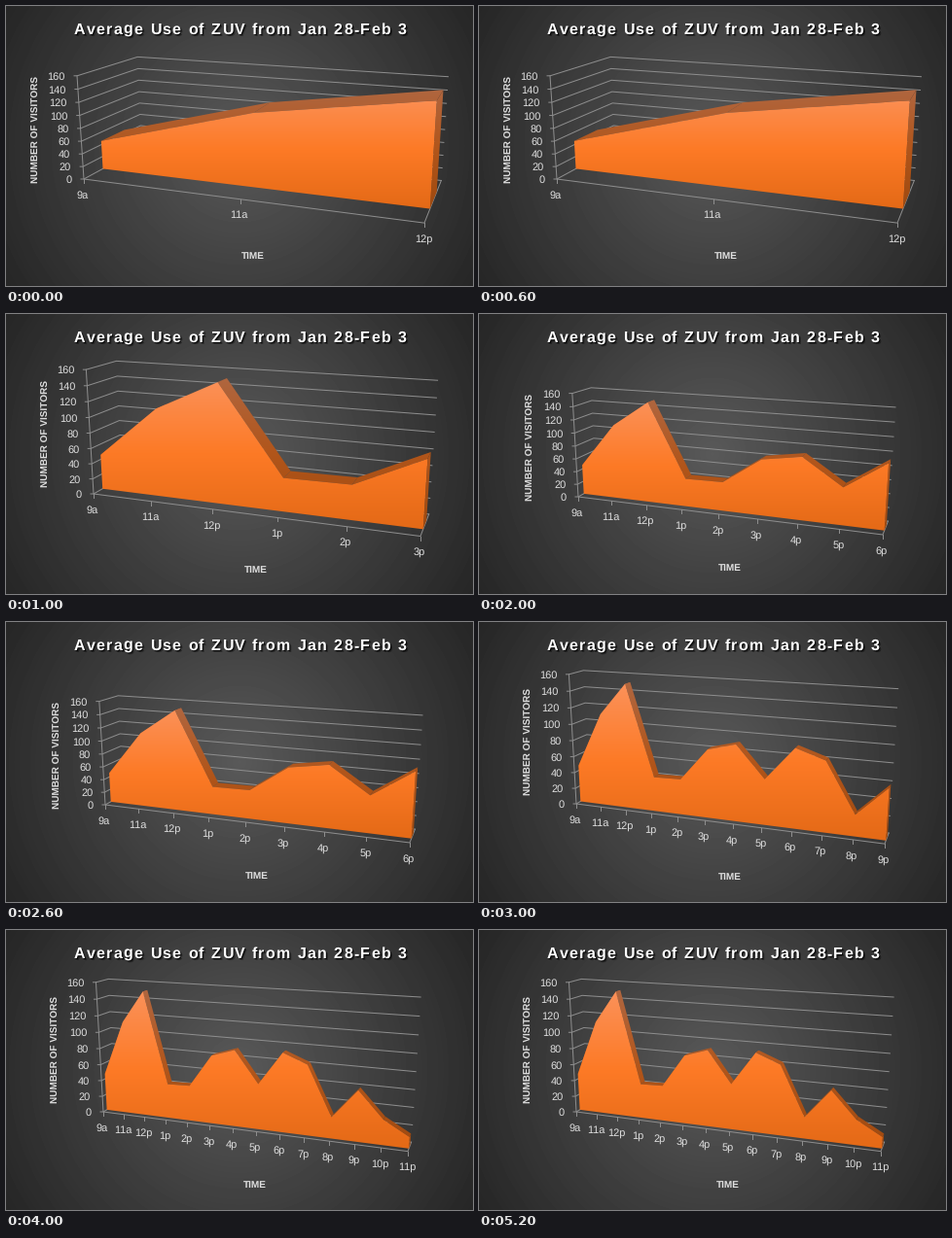
Recreate the animation shown at these times as a matplotlib script. Size 480 by 288 pixels, loop 6000 ms.

```python
import numpy as np
import matplotlib.pyplot as plt
from matplotlib.animation import FuncAnimation
from matplotlib.patches import Polygon
from matplotlib.textpath import TextPath

W, H, DPI = 480, 288, 96
PX = 72 / DPI
FONT = "Liberation Sans"
LINE = "#8e8e8e"
TEXT = "#dedede"
YAW, PITCH, DISTANCE = np.radians(20), np.radians(15), 2.15

HOURS = ["9a", "11a", "12p"] + [f"{h}p" for h in range(1, 12)]
VISITORS = [46, 113, 151, 42, 43, 82, 91, 54, 93, 82, 25, 59, 29, 13]
TOP = 160

plt.rcParams["text.hinting"] = "none"
plt.rcParams["text.hinting_factor"] = 1
fig = plt.figure(figsize=(W / DPI, H / DPI), dpi=DPI)
ax = fig.add_axes([0, 0, 1, 1])
ax.axis("off")


def camera(base, width, height, depth):
    """Map (across, up, back), each 0..1 in the chart box, to pixels."""
    tall = 1.03 * height / width

    def view(u, v, d):
        x, y, z = u - 0.5, (v - 0.5) * tall, (d - 0.5) * depth
        x, z = (x * np.cos(YAW) + z * np.sin(YAW),
                z * np.cos(YAW) - x * np.sin(YAW))
        y, z = (y * np.cos(PITCH) + z * np.sin(PITCH),
                z * np.cos(PITCH) - y * np.sin(PITCH))
        return np.array([x, -y]) / (DISTANCE + z)

    corner = view(0, 0, 0)
    scale = width / (view(1, 0, 0) - corner)[0]
    return lambda u, v, d: base + scale * (view(u, v, d) - corner)


def line(*pts):
    xs, ys = zip(*pts)
    return ax.plot(xs, ys, color=LINE, lw=PX, zorder=2)[0]


def label(x, y, s, size=11, **kw):
    kw = {"ha": "center", "va": "baseline", "color": TEXT, "zorder": 8, **kw}
    return ax.text(x, y, s, family=FONT, size=size * PX, **kw)


def orange(shade):
    stops = np.array([(251, 146, 91), (253, 122, 38), (227, 105, 22)]) / 255
    t = np.linspace(0, 1, 200)
    cols = [np.interp(t, [0, 0.5, 1], stops[:, k]) for k in range(3)]
    return np.stack(cols, axis=1)[:, None, :] * shade


def paint(pts, span, shade, z):
    """Fill a polygon with the vertical orange gradient."""
    pts = np.array(pts)
    x0, x1 = pts[:, 0].min() - 1, pts[:, 0].max() + 1
    img = ax.imshow(orange(shade), extent=(x0, x1, span[1], span[0]),
                    aspect="auto", interpolation="bilinear", zorder=z)
    img.set_clip_path(Polygon(pts, transform=ax.transData))
    return img


def chart(count, x, y, width, height):
    at = camera(np.array([x, y]), width, height, depth=1.05 / count)
    us = np.linspace(0, 1, count)
    vs = np.array(VISITORS[:count]) / TOP
    end = at(1, 0, 0)
    parts = [line(at(0, 1, 0), at(0, 0, 0), end, at(1, 0, 1))]

    for step in range(0, TOP + 1, 20):
        v = step / TOP
        p = at(0, v, 0)
        parts += [line(p - (3, 0), p, at(0, v, 1), at(1, v, 1)),
                  label(p[0] - 12, p[1] + 4, str(step), ha="right")]

    for u, hour in zip(us, HOURS):
        p = at(u, 0, 0)
        parts += [line(p, p + (0, 4)),
                  label(p[0] - 1, p[1] + 19.5, hour)]

    # the solid fills the middle 40 % of the depth
    rim = [*zip(us, vs), (1, 0)]
    near = [at(u, v, 0.3) for u, v in rim]
    far = [at(u, v, 0.7) for u, v in rim]
    body = [at(0, 0, 0.3)] + near
    ys = [p[1] for p in body + far]
    span = min(ys) - 1, max(ys) + 1
    for i in range(count):
        quad = [near[i], near[i + 1], far[i + 1], far[i]]
        parts.append(paint(quad, span, 0.7, 4))
    parts.append(paint(body, span, 1, 5))

    parts += [label(x - 49, y - height / 2 + 1.5, "NUMBER OF VISITORS", 10,
                    weight="bold", rotation=90, va="center"),
              label(x + width / 2 - 1, end[1] + 37, "TIME", 10,
                    weight="bold")]
    return parts


def heading(s, x, y, size=16, tracking=1.37):
    prop = {"family": FONT, "weight": "bold"}

    def reach(t):
        return TextPath((0, 0), t + "|", size=size, prop=prop).get_extents().x1

    start = reach("")
    total = reach(s) - start + tracking * (len(s) - 1)
    for i, ch in enumerate(s):
        cx = x - total / 2 + reach(s[:i]) - start + tracking * i
        for shift, color, alpha in [(2, "black", 0.35), (1, "black", 0.8),
                                    (0, "white", 1)]:
            label(cx + shift, y + shift, ch, size, weight="bold", ha="left",
                  color=color, alpha=alpha, zorder=9 + alpha)


# backdrop
gy, gx = np.mgrid[0:H, 0:W] + 0.5
radius = np.hypot(gx - W / 2, gy - H / 2) / np.hypot(W / 2, H / 2)
ax.imshow((89 - 51 * radius) / 255, cmap="gray", vmin=0, vmax=1,
          extent=(0, W, H, 0), aspect="auto", zorder=0)
heading("Average Use of ZUV from Jan 28-Feb 3", 240.5, 29)

# hours shown, axis corner, axis width and height
charts = [chart(3, 80, 178, 350, 106),
          chart(6, 90, 185, 336, 127),
          chart(9, 102, 188, 313, 106),
          chart(12, 100, 187, 317, 132),
          chart(14, 100, 187, 313, 132)]
SECONDS = 6

ax.set_xlim(0, W)
ax.set_ylim(H, 0)


def show(second):
    current = min(second, len(charts) - 1)
    for k, parts in enumerate(charts):
        for part in parts:
            part.set_visible(k == current)
    return []


anim = FuncAnimation(fig, show, frames=SECONDS, interval=1000,
                     init_func=lambda: show(0), repeat=True, repeat_delay=0)
plt.show()
```
